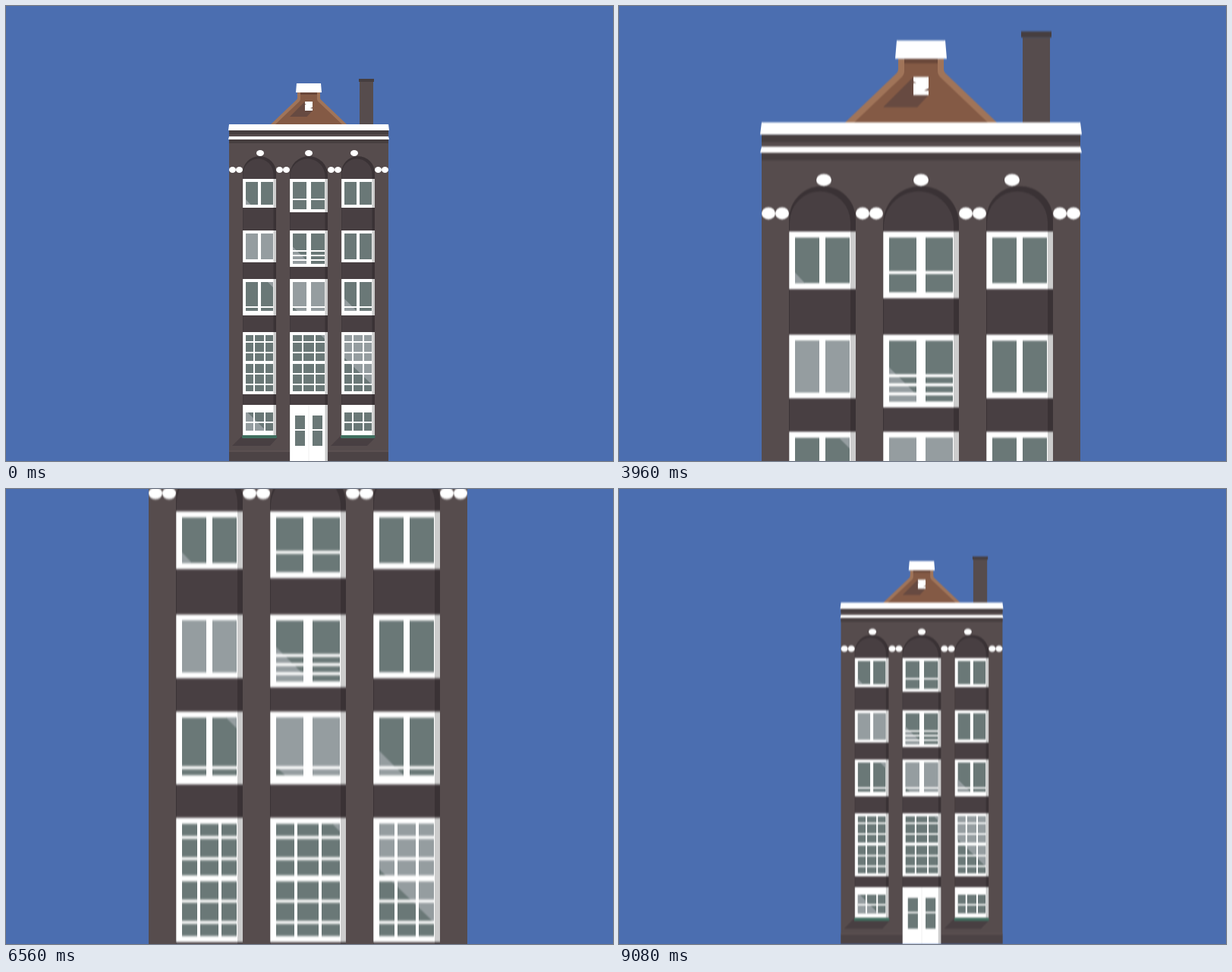
Animation, 800 px wide and 600 px high, one loop 9120 ms. Source, as an HTML page without scripts:

```html
<!DOCTYPE html>
<html lang="en">
<head>
<meta charset="utf-8">
<title>Canal house</title>
<style>
  html, body { margin: 0; width: 100%; height: 100%; overflow: hidden; background: #4b6eb0; }
  svg { display: block; width: 100vw; height: 100vh; }
  .white { fill: #fff; }
  .wall { fill: #564c4d; }
  .dark { fill: #463e3f; }
  .recess { fill: #483f42; }
  .shade { fill: #000; fill-opacity: .2; fill-rule: evenodd; }
  .glass { fill: #6a7877; stroke: #fff; stroke-width: 8; }
  .pane { fill: #6a7877; }
  .shine { fill: #959da0; }
  .bar { fill: none; stroke: #fff; stroke-width: 8; }
  .thin { fill: none; stroke: #fff; stroke-width: 4; }
  .sill { fill: #3f6f5f; }
</style>
</head>
<body>
<svg viewBox="0 0 800 600" xmlns="http://www.w3.org/2000/svg">
  <defs>
    <!-- Motion blur, proportional to camera speed -->
    <filter id="blur" filterUnits="userSpaceOnUse" x="-20" y="-30" width="840" height="660" color-interpolation-filters="sRGB">
      <feGaussianBlur stdDeviation="0 0">
        <animate attributeName="stdDeviation" dur="9.12s" repeatCount="indefinite" calcMode="spline"
          keyTimes="0;.2193;.2522;.2851;.3904;.3914;.4342;.4671;.5175;.5658;.6711;.6721;.7193;.742;.7889;.8333;.9386;.9693;1"
          values="0 0;0 0;1 2.2;0 0;0 0;0 .85;0 1.13;0 1.03;0 .71;0 0;0 0;0 1.1;0 1.47;0 1.34;0 .92;0 0;0 0;1.2 4;0 0"
          keySplines="0 0 1 1;.333 .667 .667 1;.333 0 .667 .333;0 0 1 1;0 0 1 1;0 0 1 1;0 0 1 1;0 0 1 1;0 0 1 1;0 0 1 1;0 0 1 1;0 0 1 1;0 0 1 1;0 0 1 1;0 0 1 1;0 0 1 1;.333 .667 .667 1;.333 0 .667 .333"/>
      </feGaussianBlur>
    </filter>

    <path id="arch" d="M0 736V44a44 44 0 0 1 88 0V736z"/>
    <path id="archShade" class="shade" d="M0 736V44a44 44 0 0 1 88 0V736zM1 736V48a40 41 0 0 1 80 0V736z"/>

    <!-- Glass and bars of the side windows -->
    <rect id="g1" class="glass" x="4" y="4" width="80" height="68"/>
    <path id="b1" class="bar" d="M44 4V72"/>
    <rect id="g2" class="glass" x="4" y="4" width="80" height="76"/>
    <path id="b2" class="bar" d="M44 4V80"/>
    <rect id="g3" class="glass" x="4" y="4" width="80" height="88"/>
    <g id="b3"><path class="bar" d="M44 4V88M4 88H84"/><path class="thin" d="M4 74H84"/></g>
    <rect id="g4" class="glass" x="4" y="4" width="80" height="156"/>
    <g id="b4"><path class="bar" d="M4 80H84"/><path class="thin" d="M30 4V160M58 4V160M4 26H84M4 54H84M4 110H84M4 138H84"/></g>
    <g id="g5"><path class="white" d="M0 0h88v80H0z"/><path class="pane" d="M8 20h72v48H8z"/></g>
    <path id="b5" class="thin" d="M30 20V68M58 20V68M8 46H80"/>

    <ellipse id="knob" class="white" rx="10" ry="8"/>
    <g id="knobs" class="white"><ellipse cx="-9" rx="9" ry="8"/><ellipse cx="9" rx="9" ry="8"/></g>
  </defs>

  <g filter="url(#blur)">
    <g>
      <animateTransform attributeName="transform" type="translate" dur="9.12s" repeatCount="indefinite" calcMode="spline"
        keyTimes="0;.2193;.28509;.39035;.56579;.67105;.83333;.9386;1"
        values="200 41.5;200 41.5;0 0;0 0;0 -235;0 -235;0 -517;0 -517;200 41.5"
        keySplines="0 0 1 1;.333 0 .667 1;0 0 1 1;.167 .167 .667 1;0 0 1 1;.167 .167 .667 1;0 0 1 1;.333 0 .667 1"/>
      <animateTransform attributeName="transform" type="scale" additive="sum" dur="9.12s" repeatCount="indefinite" calcMode="spline"
        keyTimes="0;.2193;.28509;.9386;1" values=".5;.5;1;1;.5"
        keySplines="0 0 1 1;.333 0 .667 1;0 0 1 1;.333 0 .667 1"/>

      <!-- Chimney -->
      <path class="wall" d="M532 117h36v114h-36z"/>
      <path class="dark" d="M530 109h40v8h-40z"/>

      <!-- Gable -->
      <path fill="#a07459" d="M297 230L366 164Q368 162 368 159V145H428V159Q428 162 430 164L499 230z"/>
      <path fill="#845a45" d="M309 230L373 169Q376 166 376 162V145H420V162Q420 166 423 169L487 230z"/>
      <path fill="#6a4739" d="M376 145h44v6h-44z"/>
      <path fill="#674a41" d="M388 169L348 209H393L408 193z"/>
      <path class="white" d="M388 169h20v24h-20zM366 121H430L432 145H364z"/>
      <path fill="#674a41" d="M388 175l4 2h-4zM402 187l6-3v3z"/>

      <!-- Front wall and cornice -->
      <path class="wall" d="M188 245h420v872H188z"/>
      <path class="dark" d="M188 245h420v10H188zM188 269h420v10H188z"/>
      <path class="white" d="M188 229H608L610 245H186zM188 261H608L610 269H186z"/>
      <path fill="#5b5051" d="M188 1089h420v4H188z"/>
      <path fill="#4c4345" d="M188 1093h420v24H188z"/>

      <!-- Left bay -->
      <g transform="translate(224 313)">
        <path class="recess" d="M-2 738L-28 764H72L90 744V738z"/>
        <use href="#arch" class="recess"/>
        <g transform="translate(0 60)"><use href="#g1"/><path class="shine" d="M8 54L21 68H8z"/><use href="#b1"/></g>
        <g transform="translate(0 196)"><use href="#g2"/><path class="shine" d="M8 8h72v68H8z"/><use href="#b2"/></g>
        <g transform="translate(0 324)"><use href="#g3"/><path class="shine" d="M66 8H80V22z"/><use href="#b3"/></g>
        <g transform="translate(0 464)"><use href="#g4"/><use href="#b4"/></g>
        <g transform="translate(0 656)"><use href="#g5"/><path class="shine" d="M8 20H13L60 67V68H8z"/><use href="#b5"/></g>
        <use href="#archShade"/>
        <rect class="sill" x="-2" y="736" width="92" height="8" rx="3"/>
      </g>

      <!-- Middle bay -->
      <g transform="translate(348 313)">
        <path class="recess" d="M0 804V50a50 50 0 0 1 100 0V804z"/>
        <g transform="translate(0 60)">
          <rect class="glass" x="4" y="4" width="92" height="80"/>
          <path class="bar" stroke-width="12" style="stroke-width:12" d="M50 4V84"/>
          <path class="thin" d="M4 54H96"/>
        </g>
        <g transform="translate(0 196)">
          <rect class="glass" x="4" y="4" width="92" height="88"/>
          <path class="shine" d="M8 43L53 88H8z"/>
          <path class="bar" style="stroke-width:12" d="M50 4V92"/>
          <path class="thin" d="M4 54H96M4 66H96M4 78H96"/>
        </g>
        <g transform="translate(0 324)">
          <rect class="glass" x="4" y="4" width="92" height="88"/>
          <path class="shine" d="M8 8H92V84H20L8 73z"/>
          <path class="bar" style="stroke-width:12" d="M50 4V88"/>
          <path class="bar" d="M4 88H96"/>
          <path class="thin" d="M4 74H96"/>
        </g>
        <g transform="translate(0 464)">
          <rect class="glass" x="4" y="4" width="92" height="156"/>
          <path class="shine" d="M82 8H92V18z"/>
          <path class="bar" d="M4 80H96"/>
          <path class="thin" d="M34 4V160M66 4V160M4 26H96M4 54H96M4 110H96M4 138H96"/>
        </g>
        <g transform="translate(0 656)">
          <path class="white" d="M0 0h100v148H0z"/>
          <path fill="#f1f1f1" d="M49 0h2v148h-2z"/>
          <path class="pane" d="M14 28h26v36H14zM60 28h26v36H60zM14 68h26v40H14zM60 68h26v40H60z"/>
        </g>
        <path class="shade" d="M0 804V50a50 50 0 0 1 100 0V804zM1 804V53a46 46 0 0 1 92 0V804z"/>
      </g>

      <!-- Right bay -->
      <g transform="translate(484 313)">
        <path class="recess" d="M-2 738L-28 764H68L88 744V738z"/>
        <use href="#arch" class="recess"/>
        <g transform="translate(0 60)"><use href="#g1"/><use href="#b1"/></g>
        <g transform="translate(0 196)"><use href="#g2"/><use href="#b2"/></g>
        <g transform="translate(0 324)"><use href="#g3"/><path class="shine" d="M8 52L40 84H8z"/><use href="#b3"/></g>
        <g transform="translate(0 464)"><use href="#g4"/><path class="shine" d="M8 8H80V138L8 68z"/><use href="#b4"/></g>
        <g transform="translate(0 656)"><use href="#g5"/><use href="#b5"/></g>
        <use href="#archShade"/>
        <rect class="sill" x="-2" y="736" width="91" height="8" rx="3"/>
      </g>

      <!-- Ornaments -->
      <use href="#knob" x="270" y="305"/>
      <use href="#knob" x="398" y="305"/>
      <use href="#knob" x="518" y="305"/>
      <use href="#knobs" x="206" y="349"/>
      <use href="#knobs" x="330" y="349"/>
      <use href="#knobs" x="466" y="349"/>
      <use href="#knobs" x="590" y="349"/>
    </g>
  </g>
</svg>
</body>
</html>
```
